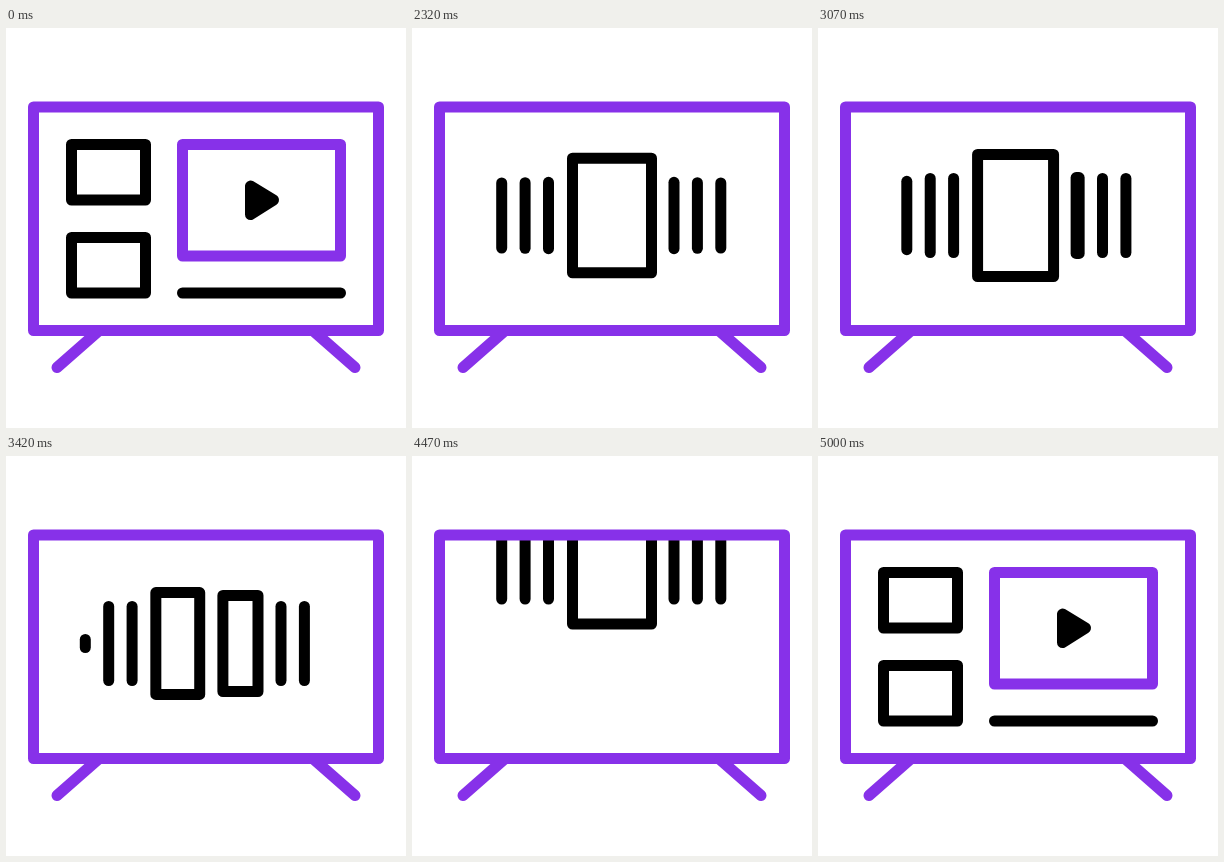
An HTML page with a canvas for the animation above (5.02 s loop, 400 by 400 pixels).

```html
<!DOCTYPE html>
<html lang="en">
<head>
<meta charset="utf-8">
<title>TV carousel</title>
<style>
html, body { margin: 0; height: 100%; overflow: hidden; background: #fff; }
canvas { display: block; width: 100vw; height: 100vh; }
</style>
</head>
<body>
<canvas id="stage" width="400" height="400"></canvas>
<script>
const ctx = document.getElementById('stage').getContext('2d');
const LOOP = 5020, PURPLE = '#8731e9', BLACK = '#000';
const MID = 187.5, GAP = 23.4, BAR = 74, CARD = 124;

const progress = (t, start, end) => Math.min(1, Math.max(0, (t - start) / (end - start)));
const mix = (a, b, k) => a + (b - a) * k;
const easeOut = (u, power) => 1 - (1 - u) ** power;
const easeInOut = u => u < 0.5 ? 2 * u * u : 1 - 2 * (1 - u) ** 2;

function path(color, points, closed) {
  ctx.beginPath();
  for (const [x, y] of points) ctx.lineTo(x, y);
  if (closed) ctx.closePath();
  ctx.strokeStyle = color;
  ctx.stroke();
}

function box(color, l, t, r, b) {
  path(color, [[l, t], [r, t], [r, b], [l, b]], true);
}

function bar(x, height) {
  if (height > 0) path(BLACK, [[x, MID - height / 2], [x, MID + height / 2]]);
}

function card(l, r, height) {
  if (height > 0) box(BLACK, l, MID - height / 2, r, MID + height / 2);
}

function drawTv() {
  box(PURPLE, 27.5, 79, 372.5, 302.5);
  path(PURPLE, [[51, 339.5], [92, 303.5]]);
  path(PURPLE, [[349, 339.5], [308, 303.5]]);
}

function drawMenu(dx, dy) {
  ctx.save();
  ctx.translate(dx, dy);
  box(BLACK, 65.5, 116.5, 139.5, 172);
  box(BLACK, 65.5, 209.5, 139.5, 265);
  box(PURPLE, 176.5, 116.5, 334.5, 228);
  path(BLACK, [[176.5, 265], [334.5, 265]]);
  path(BLACK, [[244.5, 158], [244.5, 186.5], [267.5, 172]], true);
  ctx.fillStyle = BLACK;
  ctx.fill();
  ctx.restore();
}

// s: how far the row has advanced by one place
function drawCarousel(t, s, dy) {
  const grow = delay => easeOut(progress(t, 2220 + delay, 2470 + delay), 5);
  ctx.save();
  ctx.translate(0, dy);
  for (let i = 0; i < 3; i++) {
    const size = BAR * grow(10 + 2.5 * i);
    const left = 136.5 - GAP * i, right = 262 + GAP * i;
    if (i) bar(left + GAP * s, size);
    if (i < 2) {
      if (i || !s) bar(right + GAP * s, size);
    } else {
      bar(right, size * Math.max(0, 1 - s * 4));
    }
    if (!i && !s) bar(left, size);
  }
  if (s) {
    bar(mix(66.3, 89.7, s), BAR * (2 * s - 1));
    bar(262 + GAP * s, s > 0.999 ? BAR : BAR);
    card(mix(136.5, 160.5, s), mix(136.5, 239.5, s), mix(BAR, CARD, s));
    card(mix(160.5, 262, s), mix(239.5, 262, s), mix(CARD, BAR, s));
  } else {
    card(160.5, 239.5, CARD * grow(0));
  }
  ctx.restore();
}

function draw(t) {
  ctx.fillStyle = '#fff';
  ctx.fillRect(0, 0, 400, 400);
  ctx.lineWidth = 11;
  ctx.lineCap = ctx.lineJoin = 'round';

  ctx.save();
  ctx.beginPath();
  ctx.rect(33, 84, 334, 213);
  ctx.clip();
  if (t < 2260) drawMenu(310 * progress(t, 2000, 2260) ** 2, 0);
  if (t > 2220 && t < 4640) {
    const step = [2470, 2890, 3310].find(start => t > start && t < start + 210);
    const s = step ? easeInOut((t - step) / 210) : 0;
    drawCarousel(t, s, -175 * progress(t, 3900, 4637) ** 3);
  }
  if (t >= 4640) drawMenu(0, -187 * (1 - easeOut(progress(t, 4640, 5000), 2)));
  ctx.restore();
  drawTv();
}

const begin = performance.now();
function tick() {
  draw((performance.now() - begin) % LOOP);
  requestAnimationFrame(tick);
}
tick();
</script>
</body>
</html>
```
